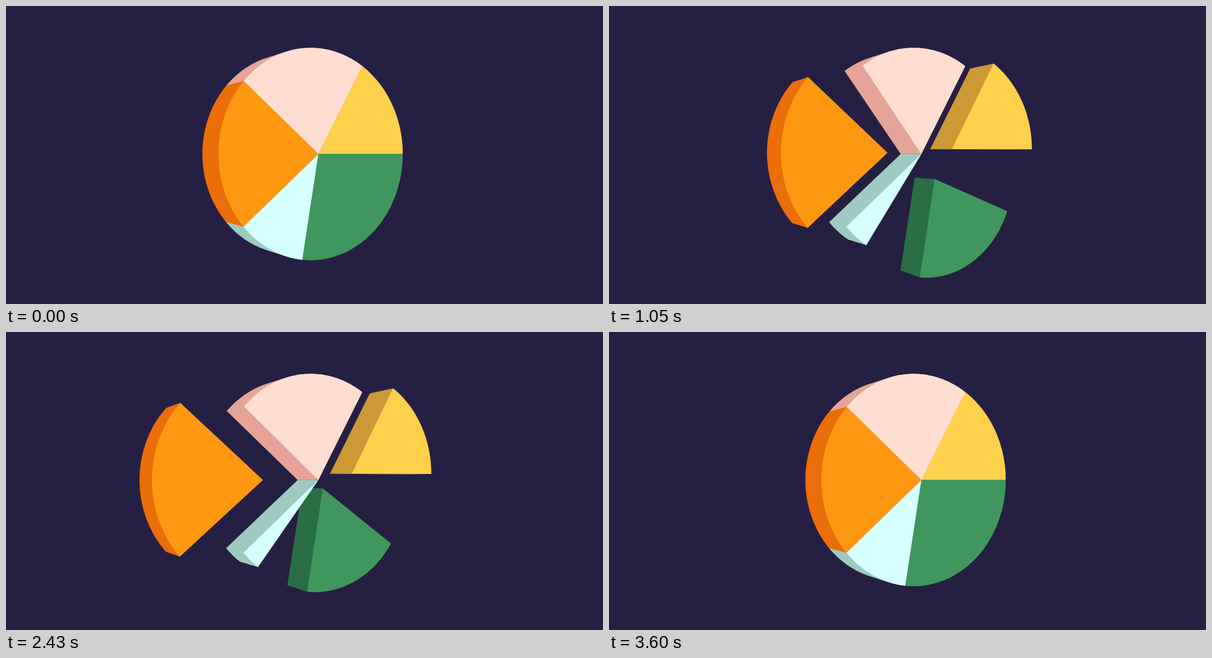
Write an HTML page with a canvas that moves like this. It is 1058x529 px and loops after 3.63 s.

```html
<!DOCTYPE html>
<html lang="en">
<head>
<meta charset="utf-8">
<title>Pie chart</title>
<style>
  html, body { margin: 0; width: 100%; height: 100%; overflow: hidden; background: #252043; }
  canvas { display: block; width: 1058px; height: 529px; }
</style>
</head>
<body>
<canvas id="stage" width="1058" height="529"></canvas>
<script>
const ctx = document.getElementById('stage').getContext('2d');
const LOOP = 3630, STEP = 30, HALF = 1800;

// Cubic Bezier easing with flat ends; x1 and x2 are the handle positions
const bezier = (x1, x2) => p => {
  let lo = 0, hi = 1, u;
  for (let i = 0; i < 24; i++) {
    u = (lo + hi) / 2;
    const x = 3 * (1 - u) ** 2 * u * x1 + 3 * (1 - u) * u * u * x2 + u ** 3;
    if (x < p) lo = u; else hi = u;
  }
  return u * u * (3 - 2 * u);
};
const smooth = bezier(1 / 3, 2 / 3);
const soft = bezier(.22, .6);
const even = bezier(.2, .8);
const early = bezier(.167, .55);
const late = bezier(.45, .833);

// Keys are [time, value, easing towards this key]
function track(keys, t) {
  let i = 1;
  while (i < keys.length - 1 && t > keys[i][0]) i++;
  const [t0, v0] = keys[i - 1], [t1, v1, ease] = keys[i];
  return v0 + (v1 - v0) * ease((t - t0) / (t1 - t0));
}

const yellowOut = [[0, 0], [HALF, .462, early], [2 * HALF, 0, late]];
const orangeOut = [[0, 0], [450, .631, soft], [HALF, 0, even], [2250, .631, soft], [2 * HALF, 0, soft]];
const greenOut = [[0, 0], [900, .352, early], [2 * HALF, 0, soft]];
const greenEnd = [[0, 360], [HALF, 322, bezier(.4, .7)], [2250, 327.5, soft],
  [2700, 320, smooth], [2 * HALF, 360, smooth]];

// Eased back-and-forth from a to b and back, one way lasting `time`
function swing(a, b, time, t) {
  const p = t / time % 2;
  return a + (b - a) * smooth(p < 1 ? p : 2 - p);
}

// Disc radius is 1 and thickness is 1 along z
function project(x, y, z) {
  const w = 1 + .0842 * x + .062 * z;
  return [553.5 + (162.1 * x - 38.8 * z) / w, 262.7 - 187.8 * y / w];
}

function hull(points) {
  const sorted = points.slice().sort((a, b) => a[0] - b[0] || a[1] - b[1]);
  const half = list => {
    const out = [];
    for (const p of list) {
      while (out.length > 1) {
        const [a, b] = out.slice(-2);
        if ((b[0] - a[0]) * (p[1] - a[1]) - (b[1] - a[1]) * (p[0] - a[0]) > 0) break;
        out.pop();
      }
      out.push(p);
    }
    out.pop();
    return out;
  };
  return half(sorted).concat(half(sorted.reverse()));
}

function fill(points, color) {
  ctx.beginPath();
  points.forEach(p => ctx.lineTo(p[0], p[1]));
  ctx.closePath();
  ctx.fillStyle = color;
  ctx.fill();
}

function slice(from, to, [x, y, z], face, side) {
  const outline = depth => {
    const pts = [project(x, y, z + depth)];
    const steps = 64;
    for (let i = 0; i <= steps; i++) {
      const a = (from + (to - from) * i / steps) * Math.PI / 180;
      pts.push(project(x + Math.cos(a), y + Math.sin(a), z + depth));
    }
    return pts;
  };
  const front = outline(0);
  fill(hull(front.concat(outline(1))), side);
  fill(front, face);
}

function draw(t) {
  ctx.fillStyle = '#252043';
  ctx.fillRect(0, 0, 1058, 529);

  const y = track(yellowOut, t);
  const o = track(orangeOut, t);
  const g = track(greenOut, t);
  const still = [0, 0, 0];
  const lift = t < HALF ? .03 * o : 0;

  slice(0, 60, [y, .01 * y + 1.12 * y ** 3, 0], '#ffd04b', '#cb9936');
  slice(260, track(greenEnd, t), [g, -.738 * g, 2.29 * g], '#3f975e', '#2a6e43');
  slice(60, swing(140, 60, 600, t), still, '#ffded1', '#e5a497');
  slice(220, swing(260, 220, HALF, t), still, '#d6ffff', '#9fcac1');
  slice(139.7, 220, [-o, lift, 0], '#ff9811', '#eb6e08');
}

const start = performance.now();
function tick() {
  const t = (performance.now() - start) % LOOP;
  draw(Math.floor(t / STEP) * STEP);
  requestAnimationFrame(tick);
}
tick();
</script>
</body>
</html>
```
